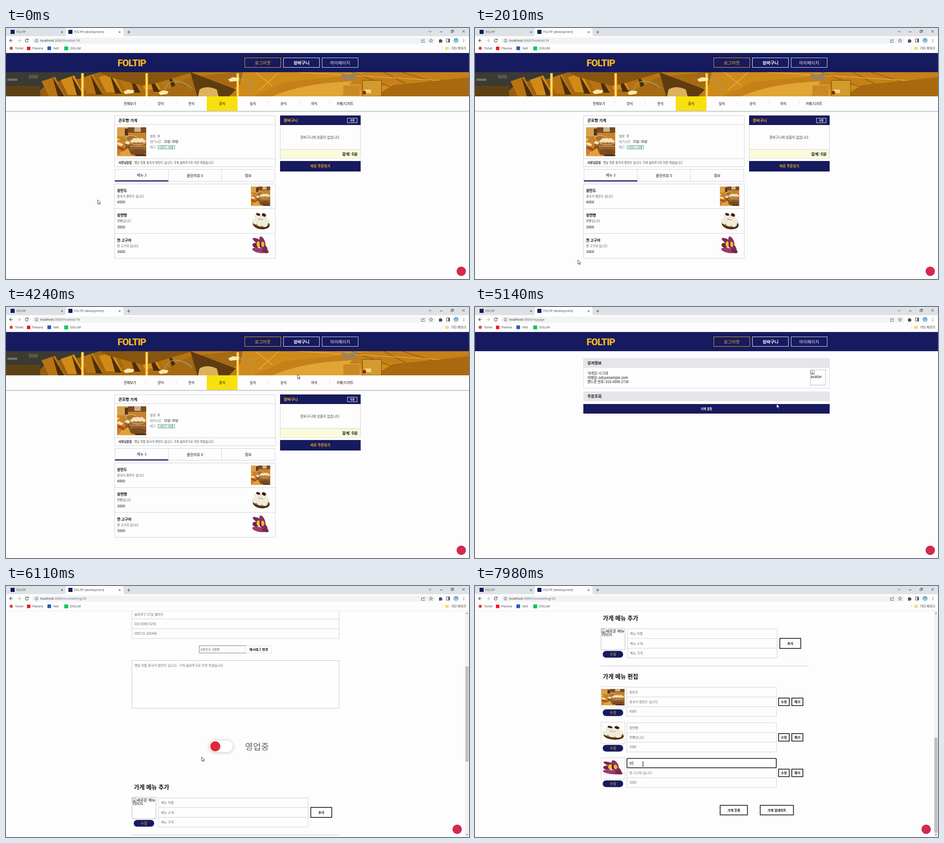
An HTML page for the animation above (8000 ms loop, 1017x551 px).

```html
<!DOCTYPE html>
<html lang="ko">
<head>
<meta charset="utf-8">
<title>FOLTIP</title>
<style>
html, body { margin: 0; width: 100%; height: 100%; overflow: hidden; background: #fdfdfd; }
svg { display: block; }
#stage { width: 1017px; height: 551px; font-family: "Noto Sans CJK KR", "Noto Sans CJK", "Noto Sans", sans-serif; }
#stage text { white-space: pre; }
.ui { font-family: "Open Sans", "Noto Sans CJK KR", sans-serif; }
</style>
</head>
<body>
<svg id="stage" viewBox="0 0 1017 551" xmlns="http://www.w3.org/2000/svg"></svg>
<script>
const NAVY = '#161a5e', AMBER = '#f0b323', LINE = '#d2d2da', GREY = '#6c6c6c', INK = '#111';
const LOOP = 8000;

// Drawing helpers; text y is the middle of the line.
const text = (x, y, s, size, fill = INK, more = '') =>
  `<text x="${x}" y="${y + size * .37}" font-size="${size}" fill="${fill}" ${more}>${s}</text>`;
const rect = (x, y, w, h, fill = 'none', stroke = 'none', more = '') =>
  `<rect x="${x}" y="${y}" width="${w}" height="${h}" fill="${fill}" stroke="${stroke}" ${more}/>`;
const path = (d, stroke, w = 1, fill = 'none', more = '') =>
  `<path d="${d}" stroke="${stroke}" stroke-width="${w}" fill="${fill}" ${more}/>`;
const disc = (x, y, r, fill) => `<circle cx="${x}" cy="${y}" r="${r}" fill="${fill}"/>`;
const oval = (x, y, rx, ry, fill, turn = 0) =>
  `<ellipse rx="${rx}" ry="${ry}" fill="${fill}" transform="translate(${x} ${y}) rotate(${turn})"/>`;
const group = (id, body, more = '') => `<g id="${id}" ${more}>${body}</g>`;
const times = (n, f) => Array.from({ length: n }, (_, i) => f(i)).join('');
const MID = 'text-anchor="middle"', BOLD = 'font-weight="700"', MED = 'font-weight="500"';
const MIDBOLD = MID + ' ' + BOLD;
const pic = (name, x, y, w, h) =>
  `<svg x="${x}" y="${y}" width="${w}" height="${h}" viewBox="0 0 64 64" preserveAspectRatio="none"><use href="#${name}"/></svg>`;

function foods() {
  const basket = (x, y, rx) =>
    rect(x - rx, y, rx * 2, 23, '#94602c') + oval(x, y + 23, rx, 7, '#7b4a20') +
    rect(x - rx, y + 9, rx * 2, 2, '#c99450') + oval(x, y, rx, 8, '#d9a75c') + oval(x, y, rx - 2, 6, '#a97235');
  const mandu = rect(0, 0, 64, 64, '#c8822c') + rect(0, 0, 64, 12, '#7c4a21') +
    rect(0, 0, 24, 20, '#d9a04a') + rect(17, 3, 7, 15, '#58351d') + rect(38, 0, 14, 10, '#c9b489') +
    basket(31, 25, 13) +
    times(22, i => oval(2 + i * 7.3 % 24, 27 + i * 11.7 % 36, 3.4, 2.6, ['#f2c545', '#f6e1b0', '#b9471c'][i % 3], -25)) +
    basket(46, 32, 18) +
    times(7, i => oval(34 + i * 4, 31 - i % 2 * 4, 4, 3, '#f5e3bd')) +
    path('M0 64L24 45 32 64Z', 'none', 0, '#e0a13a') + rect(40, 60, 24, 4, '#4c2d18');
  const bun = (x, y, r = 10) => oval(x, y + 1, r + .6, r * .92, '#c9c2a6') + oval(x, y, r, r * .9, '#f1eddc');
  const buns = rect(0, 0, 64, 64, '#fcfcfa') + oval(34, 43, 28, 16, '#4b2d17', 8) + oval(33, 39, 26, 13, '#9b6b37', 8) +
    bun(23, 15) + bun(42, 14) + oval(24, 10, 7, 4, '#42211d', 20) + oval(43, 12, 7, 5, '#3a1c1a', 30) +
    bun(16, 32, 11) + bun(49, 32, 11) + bun(31, 38, 12) + bun(46, 43, 9);
  const potato = rect(0, 0, 64, 64, '#fdfcfd') + oval(24, 17, 20, 7, '#7d2b56', 28) + oval(38, 18, 18, 8, '#8e2f60', 68) +
    oval(16, 30, 11, 8, '#6f234b', 10) + oval(43, 38, 16, 9, '#842a59', 52) + oval(27, 47, 23, 8, '#9d3b69', 12) +
    oval(48, 50, 11, 6, '#76264e', 15) + oval(24, 26, 5, 9, '#f3c52d', 8) + oval(39, 27, 5, 9, '#f0bd1f', -5) +
    oval(31, 29, 2.5, 9, '#5d1c3c');
  return `<defs>
    <linearGradient id="tent" x2="1"><stop offset="0" stop-color="#8c5710"/><stop offset=".45" stop-color="#bd7a13"/>
      <stop offset=".75" stop-color="#d9961c"/><stop offset="1" stop-color="#b87411"/></linearGradient>
    <linearGradient id="sky" x2="0" y2="1"><stop offset="0" stop-color="#5aa0c8"/><stop offset="1" stop-color="#b9dbe6"/></linearGradient>
    <filter id="soft" x="-40%" y="-60%" width="180%" height="220%"><feGaussianBlur stdDeviation="3.5"/></filter>
    ${group('mandu', mandu)}${group('buns', buns)}${group('potato', potato)}</defs>`;
}

function browser() {
  const tab = (x, s) => rect(x, 4, 9, 9, NAVY) + text(x + 13, 8.7, s, 6.4, '#45474a') ;
  const cross = (x, y, r, c) => path(`M${x - r} ${y - r}l${2 * r} ${2 * r}m0 ${-2 * r}l${-2 * r} ${2 * r}`, c, .9);
  const dark = '#4c4f53';
  return group('browser',
    rect(0, 0, 1017, 18, '#dee1e6') + rect(0, 18, 1017, 36.5, '#fdfdfd') +
    path('M127 18q4 0 4-4V4q0-4 4-4H254q4 0 4 4v10q0 4 4 4z', 'none', 0, '#fdfdfd') +
    tab(10, 'FOLTIP') + tab(137, 'FOLTIP (development)') +
    cross(123, 9, 2, '#333') + cross(249.5, 9, 2, '#333') +
    path('M266 9h7M269.5 5.500v7', dark, 1.1) +
    path('M929 6.500l2.700 2.700 2.700-2.700M953 8.500h6', '#333', .9) +
    rect(977.5, 6, 4, 4, 'none', '#333', 'stroke-width=".8"') + path('M979 6v-1.300h4v4h-1.300', '#333', .8) +
    cross(1005, 7.500, 2.600, '#333') +
    path('M15 27.500H8m3.500-3.500L8 27.500l3.500 3.500', dark, 1.1) +
    path('M25 27.500h7m-3.500-3.500l3.500 3.500-3.500 3.500', '#b8babd', 1.1) +
    path('M48.500 25.500a3.400 3.400 0 1 0 .5 3M49 23.500v2.700h-2.700', dark, 1.1) +
    rect(57, 21, 886, 13.500, '#f1f3f4', 'none', 'rx="6.700"') +
    `<circle cx="67" cy="27.700" r="3.300" fill="none" stroke="${dark}" stroke-width=".8"/>` +
    path('M67 27v2.500M67 25.500v.8', dark, .9) +
    `<text x="75" y="30.200" font-size="7.200" fill="#26282b">localhost<tspan id="url" fill="#64686c"></tspan></text>` +
    path('M914.500 25.500h-2v6h7v-2M914.500 29q.5-3 4.500-3m-2-2l2.500 2-2.500 2', dark, .8) +
    path('M933.500 23.500l1.100 2.900 3 .1-2.400 1.900.9 3-2.600-1.800-2.600 1.800.9-3-2.400-1.900 3-.1z', dark, .8) +
    path('M951 25.500h2a1.300 1.300 0 0 1 2.600 0h2v2a1.300 1.300 0 0 1 0 2.600v2h-6.600z', 'none', 0, dark) +
    rect(967.500, 24, 7, 7, 'none', dark) + rect(971.500, 24, 3, 7, dark) +
    disc(988.500, 27.700, 5.700, 'url(#sky)') +
    times(3, i => disc(1005.500, 25 + i * 2.700, .8, dark)) +
    disc(11.500, 44.500, 3.500, '#e04436') + rect(46, 41, 7.500, 7.500, '#f5141d') +
    rect(91, 40.500, 8, 8, '#215dbd') + rect(128, 40.500, 8.500, 8.500, '#08c75b') +
    ['Tomel', 'Plavona', 'Nelt', 'DOLUM'].map((s, i) => text([20, 58, 104, 141][i], 44.300, s, 6.360, '#3d3f42')).join('') +
    path('M958.500 40v9', '#d4d6da', .8) + rect(965, 41.500, 7.500, 6.500, '#fbd96b', 'none', 'rx="1"') +
    text(977, 44.300, '기타 북마크', 7, '#3d3f42') + path('M0 54.500H1017', '#e4e6e8', .8),
    'class="ui"');
}

function header() {
  const button = (i, s, c, w) => rect(524.500 + i * 85, 65.500, 79, 21, 'none', c, 'stroke-width=".9"') +
    text(564 + i * 85, 76, s, 9.540, c, MID + ` font-weight="${w}"`);
  return rect(0, 54.500, 1017, 42.500, NAVY) +
    `<text x="245" y="83.500" font-family="Roboto, sans-serif" font-weight="900" font-size="21" letter-spacing="-1" fill="${AMBER}">FOLTIP</text>` +
    button(0, '로그아웃', AMBER, 500) + button(1, '장바구니', '#fff', 700) + button(2, '마이페이지', '#e9e9f2', 400);
}

function banner() {
  const lamp = (x, y, w) => path(`M${x} ${y + 5}l${w * .4}-5 ${w * .6} 2-3 6-${w * .7} 2z`, 'none', 0, '#fbe9a8');
  return `<svg y="97" width="1017" height="53" viewBox="0 0 1017 53">` +
    rect(0, 0, 1017, 53, 'url(#tent)') +
    path('M0 0H205L165 14 95 22 60 53H0Z', 'none', 0, '#3b3a33') +
    rect(0, 30, 75, 23, '#5d4115') + rect(3, 14, 22, 5, '#6f7063') + rect(50, 6, 20, 8, '#55574f') +
    times(7, i => path(`M${78 + i * 42} ${20 - i * 3}l30-10 22 43h-36z`, 'none', 0, i % 2 ? '#d18a17' : '#b87413') +
      path(`M${102 + i * 42} ${10 - i * 2}l12 43h14z`, 'none', 0, '#4b2e0c')) +
    path('M205 0H410L330 24 300 30 225 10Z', 'none', 0, '#875510') +
    path('M330 53L400 12 500 0H560L470 53Z', 'none', 0, '#a56a13') +
    path('M405 0L505 38 490 53H420Z', 'none', 0, '#5f3c0f') +
    path('M520 0H760L640 20 560 44 545 53H508Z', 'none', 0, '#cf8b1a') +
    path('M560 48L610 22 740 8 800 0H1017V10L850 26 700 53H555Z', 'none', 0, '#c5801a') +
    path('M585 53Q650 24 760 20L735 53Z', 'none', 0, '#e0a535') +
    path('M830 0L930 53M870 0l147 45M760 0L900 53', '#8f5a10', 1.5) +
    path('M548 0L585 30M600 0L555 40M640 0L1017 22', '#f0b848', 1.2) +
    path('M810 53L850 28 1017 12V53Z', 'none', 0, '#a8690f') +
    [165, 306, 506].map(x => rect(x, 2, 6, 51, '#f4b52d') + rect(x + 2, 3, 2, 50, '#ffe89a')).join('') +
    path('M347 42Q355 18 375 20T408 36M512 18Q545 8 538 48', '#9b9c70', 1.8) +
    lamp(258, 38, 24) + lamp(335, 40, 22) + lamp(488, 11, 25) +
    path('M425 38q16-10 38 0l4 15h-45z', 'none', 0, '#ddb25a') +
    path('M735 2l15 4 22-6-8 18-25-4z', 'none', 0, '#9b8360') +
    rect(740, 28, 38, 25, '#c98a25', '#f0b848') + rect(783, 18, 42, 35, '#d39a2c', '#70450f') +
    rect(788, 38, 14, 8, '#f4d67d') + disc(787, 45, 4, '#8a2a12') + '</svg>';
}

function shopPage() {
  const nav = ['전체보기', '양식', '한식', '중식', '일식', '분식', '야식', '카페/디저트'];
  const foodsList = [['왕만두', '중국식 왕만두 입니다', 4000, 'mandu'], ['왕찐빵', '찐빵입니다', 3000, 'buns'], ['찐 고구마', '찐 고구마 입니다', 3000, 'potato']];
  return header() + banner() +
    rect(0, 182, 1017, 1.500, '#b9b9b9') + rect(0, 183.500, 1017, 1.500, '#ececec') + rect(441, 150, 67.500, 32, '#f8e00e') +
    [0, 1, 4, 5, 6].map(i => rect(306 + i * 67.500, 160, .8, 9, '#d8d8d8')).join('') +
    nav.map((s, i) => text(272.300 + i * 67.500, 166.500, s, 7.420, INK, MID + ' ' + MED)).join('') +
    rect(238.500, 192.500, 353, 112, 'none', LINE) + path('M238.500 212H591.500M238.500 287H591.500', LINE) +
    text(247, 202.500, '큰호빵 가게', 8.480, INK, BOLD) + pic('mandu', 244, 218, 64, 63.500) +
    text(316, 237.500, '별점', 6.890, GREY) + text(333.500, 237.500, '0', 6.890) +
    text(316, 249.700, '대기시간', 6.890, GREY) + text(347, 249.700, '15분~30분', 6.890) +
    text(316, 261.700, '태그', 6.890, GREY) + rect(334, 258, 36.500, 7.500, 'none', '#2c8774', 'stroke-width=".8"') +
    text(352.200, 261.700, '#왕만두 #찐빵', 5.200, '#1d7563', MID) +
    text(247, 296, '사장님알림', 6.360, '#222', BOLD) +
    text(281.500, 296, '옛날 전통 중국식 왕만두 입니다. 가게 솔마루구로 이전 하였습니다', 6.360, '#444') +
    rect(239.500, 310.500, 351, 26, 'none', LINE) + path('M356.500 310V337M473.500 310V337', LINE) + rect(239, 334.500, 117.500, 2.500, NAVY) +
    text(298, 323, '메뉴 3', 7.950, NAVY, MID) + text(415, 324, '클린리뷰 0', 7.950, INK, MID + ' ' + MED) + text(532, 324, '정보', 7.950, INK, MID + ' ' + MED) +
    rect(238.500, 342.500, 353, 163, 'none', LINE) + path('M238.500 396.500H591.500M238.500 451H591.500', LINE) +
    foodsList.map(([name, note, price, art], i) => {
      const y = i * 54.500;
      return text(244, 357 + y, name, 7.950, INK, BOLD) + text(244, 369.500 + y, note, 6.650, '#555') +
        (i == 2 ? rect(244, 485.500, 4.500, 11, '#3390ff', 'none', 'id="mark"') : '') +
        text(244, 382.300 + y, price, 7.950, INK) + pic(art, 538, 348 + y, 42.500, 42.500);
    }).join('') +
    '<text id="picked" x="244" y="494.250" font-size="7.950" fill="#fff"></text>' +
    rect(602.500, 192.500, 176, 94, 'none', LINE) + rect(602, 192, 177, 21, NAVY) + rect(603, 267, 175, 19.500, '#fbfbdc') + path('M602.500 266.700H778.500', LINE) +
    text(610, 203, '장바구니', 8.480, AMBER, BOLD) + rect(750, 198, 21, 10, 'none', '#fff', 'stroke-width=".9"') +
    text(760.500, 203, '리셋', 5.300, '#fff', MIDBOLD) + text(690.500, 240, '장바구니에 상품이 없습니다.', 7.420, '#444', MID) +
    text(772, 277, '합계: 0원', 8.480, INK, 'text-anchor="end" ' + BOLD) +
    rect(602, 292, 177, 23, NAVY) + text(690.500, 303.700, '바로 주문하기', 7.420, AMBER, MIDBOLD);
}

const broken = (x, y) => path(`M${x} ${y}h6l2.500 2.500v6.500h-8.500z`, '#9a9a9a', .8, '#d7e6f8') +
  path(`M${x + .5} ${y + 8.500}l3-4 4 4z`, 'none', 0, '#58a846');

function userPage() {
  const bar = (y, s) => rect(238.500, y, 540, 20, '#e5e5ea', '#dcdce2', 'stroke-width=".8"') + text(247, y + 10.300, s, 8.480, INK, BOLD);
  return header() + rect(238.500, 113, 540, 65, 'none', '#dadae0') + bar(113, '유저정보') +
    ['닉네임: 나그네', '이메일: odi@example.com', '핸드폰 번호: 010-0000-2736'].map((s, i) => text(247, 145.500 + i * 9.600, s, 7.420)).join('') +
    rect(736.500, 138, 33.500, 33.500, 'none', '#bdbdc6') + broken(737.500, 139) + text(737, 152.500, 'avatar', 8.480) +
    bar(186, '주문조회') + rect(238, 213, 541, 21, NAVY) + text(508.500, 224, '가게 설정', 6.360, '#fff', MIDBOLD);
}

function truckPage() {
  const fields = (x, y, w, rows, tag = '') => rect(x, y, w, rows.length * 21.300, 'none', LINE) +
    rows.map((s, i) => (i ? path(`M${x} ${y + i * 21.300}h${w}`, LINE) : '') +
      text(x + 5.500, y + 10.800 + i * 21.300, s, 7.070, GREY, i || !tag ? '' : `id="${tag}"`)).join('');
  const pill = y => rect(280.500, y, 45, 14.800, NAVY, 'none', 'rx="7.400"') + text(303, y + 7.400, '수정', 7.950, AMBER, MID);
  const button = (x, y, w, h, s) => rect(x, y, w, h, '#fdfdfd', INK, 'stroke-width="1.600"') + text(x + w / 2, y + h / 2, s, 7.070, INK, MIDBOLD);
  const rows = [['왕만두', '중국식 왕만두 입니다', 4000], ['왕찐빵', '찐빵입니다', 3000], ['찐 고구마', '찐 고구마 입니다', 3000]];
  const upper = `<g transform="translate(-4.500 -270)">${''}</g>` +
    `<g transform="translate(-4.500 -270)">${header()}</g>` + rect(1000, -215.500, 17, 42.500, NAVY) +
    fields(276.500, 29.900, 455, ['큰호빵 가게', '솔마루구 27길 별라인', '010-0000-5291', '000731-205846']) +
    rect(424.500, 131, 102, 16, 'none', '#777') + text(427, 139, '#왕만두 #찐빵', 7.070, GREY) +
    rect(526.500, 131, 57, 16, 'none', '#dedee2', 'rx="1"') + text(555, 139, '해시태그 변경', 7.070, INK, MIDBOLD) +
    rect(276.500, 163.500, 455, 105, 'none', '#c9c9d0') +
    text(282, 174, '옛날 전통 중국식 왕만두 입니다.&#160; 가게 솔마루구로 이전 하였습니다', 7.070, GREY) +
    rect(446, 339, 53, 27, '#c9c9cf', 'none', 'rx="13.500" filter="url(#soft)"') + rect(447, 339, 51, 25.500, '#fff', 'none', 'rx="12.700"') +
    disc(459.700, 352, 11, '#e02838') + text(525, 352.500, '영업중', 19.080, '#666');
  const lower = text(281, 70, '가게 메뉴 추가', 12.720, INK, BOLD) +
    rect(277, 93, 52.500, 47, 'none', '#bdbdc6') + broken(278, 94) + text(287, 98.500, '새로운 메뉴', 8.480) + text(278, 107, '이미지', 8.480) +
    pill(142.500) + fields(335, 94, 328.500, ['메뉴 이름', '메뉴 소개', '메뉴 가격']) + button(669.500, 115, 46, 22, '추가') +
    path('M276 175.700H732', '#c4c4c4') + text(281, 198.500, '가게 메뉴 편집', 12.720, INK, BOLD) +
    rows.map((row, i) => {
      const y = i * 78;
      return rect(277, 221 + y, 52, 47, 'none', LINE) + pic(['mandu', 'buns', 'potato'][i], 277.500, 226 + y, 51, 36) + pill(270.700 + y) +
        fields(333.500, 222.300 + y, 328.500, row, i == 2 ? 'entry' : '') + button(666.800, 246 + y, 23.500, 16.500, '수정') + button(695.800, 246 + y, 24.500, 16.500, '제거');
    }).join('') +
    group('focus', rect(333.700, 378.500, 328, 20.500, 'none', '#111', 'rx="1.500" stroke-width="1.600"') + rect(0, 384.500, .8, 9, '#222', 'none', 'id="caret"')) +
    button(538.500, 481.500, 60, 21, '가게 등록') + button(626.500, 481.500, 73, 21, '가게 업데이트');
  return group('doc', upper + `<g transform="translate(0 371)">${lower}</g>`) +
    rect(1008, 55, 9, 496, '#f3f3f3') + rect(1009, 0, 7, 209, '#c1c1c1', 'none', 'id="thumb"') +
    path('M1010.500 61l2-2.500 2 2.500zM1010.500 545l2 2.500 2-2.500z', 'none', 0, '#555');
}

const stage = document.getElementById('stage');
stage.innerHTML = foods() + rect(0, 0, 1017, 551, '#fdfdfd') +
  group('shop', shopPage()) + group('user', userPage()) + group('truck', truckPage()) + browser() +
  group('badge', disc(0, 0, 10.300, '#d32a50')) +
  group('arrow', path('M0 0V9.300L2.100 7.300 3.600 10.700 5.100 10 3.700 6.800H6.600Z', '#222', .8, '#fff')) +
  group('beam', path('M-2.200-4.500h1.500q.7 0 .7.700v7.600q0 .7-.7.700h-1.500M2.200-4.500H.7Q0-4.500 0-3.800V3.800Q0 4.500.7 4.500H2.200', '#333', .9));
const el = id => document.getElementById(id);
const show = (id, on) => el(id).setAttribute('display', on ? 'inline' : 'none');
const set = (id, name, value) => el(id).setAttribute(name, value);
const move = (id, x, y) => set(id, 'transform', `translate(${x} ${y})`);

// Each key is [ms, value, ...]; values ease between keys.
function along(keys, t) {
  const i = keys.findIndex(k => k[0] > t);
  if (i < 0) return keys[keys.length - 1].slice(1);
  const a = keys[Math.max(0, i - 1)], b = keys[i];
  const p = Math.max(0, (t - a[0]) / (b[0] - a[0]));
  const e = p * p * (3 - 2 * p);
  return a.slice(1).map((v, n) => v + (b[n + 1] - v) * e);
}
const POINTER = [[0, 201.500, 377], [150, 201.500, 377], [850, 660, 238], [1150, 500, 400], [1470, 264, 508], [1670, 264, 508],
  [1980, 226, 509], [2510, 226, 509], [2800, 243, 492], [2970, 250.500, 497], [3130, 336, 488], [3310, 284, 485],
  [3540, 280, 443], [3710, 280, 443], [4450, 727, 77], [4690, 727, 77], [5130, 662.500, 212.500], [5180, 662.500, 212.500],
  [5440, 560, 222], [5560, 560, 222], [6080, 430, 375], [6400, 430, 375], [6740, 368, 397], [6850, 368, 397], [7120, 369, 391]];
const SCROLL = [[5700, 0], [6080, 270], [6310, 270], [6680, 641]];
const PATHS = { shop: ':3000/foodlist/18', user: ':3000/mypage', truck: ':3000/trucksetting/32' };

function draw(t) {
  const page = t < 4700 ? 'shop' : t < 5500 ? 'user' : 'truck';
  const [x, y] = along(POINTER, t);
  for (const id in PATHS) show(id, id == page);
  el('url').textContent = PATHS[page];
  move('badge', page == 'truck' ? 991 : 1000, 534);

  const digits = t < 2850 || t > 3420 ? 0 : t < 3010 ? 1 : 4;
  set('mark', 'width', digits * 4.450);
  el('picked').textContent = '3000'.slice(0, digits);

  const [s] = along(SCROLL, t);
  move('doc', 0, 270 - s);
  set('thumb', 'y', 62.800 + s / 641 * 270);

  const typed = t < 7500 ? '' : t < 7640 ? 'ㅉ' : t < 7800 ? '찌' : '찐';
  show('focus', t >= 7180);
  el('entry').textContent = typed || '찐 고구마';
  set('entry', 'fill', typed ? '#222' : GREY);
  set('caret', 'x', typed ? 346.500 : 339);

  const beam = t > 6640;
  show('beam', beam);
  show('arrow', !beam);
  move(beam ? 'beam' : 'arrow', x, y);
}
function tick() {
  draw(performance.now() % LOOP);
  requestAnimationFrame(tick);
}
tick();
</script>
</body>
</html>
```
